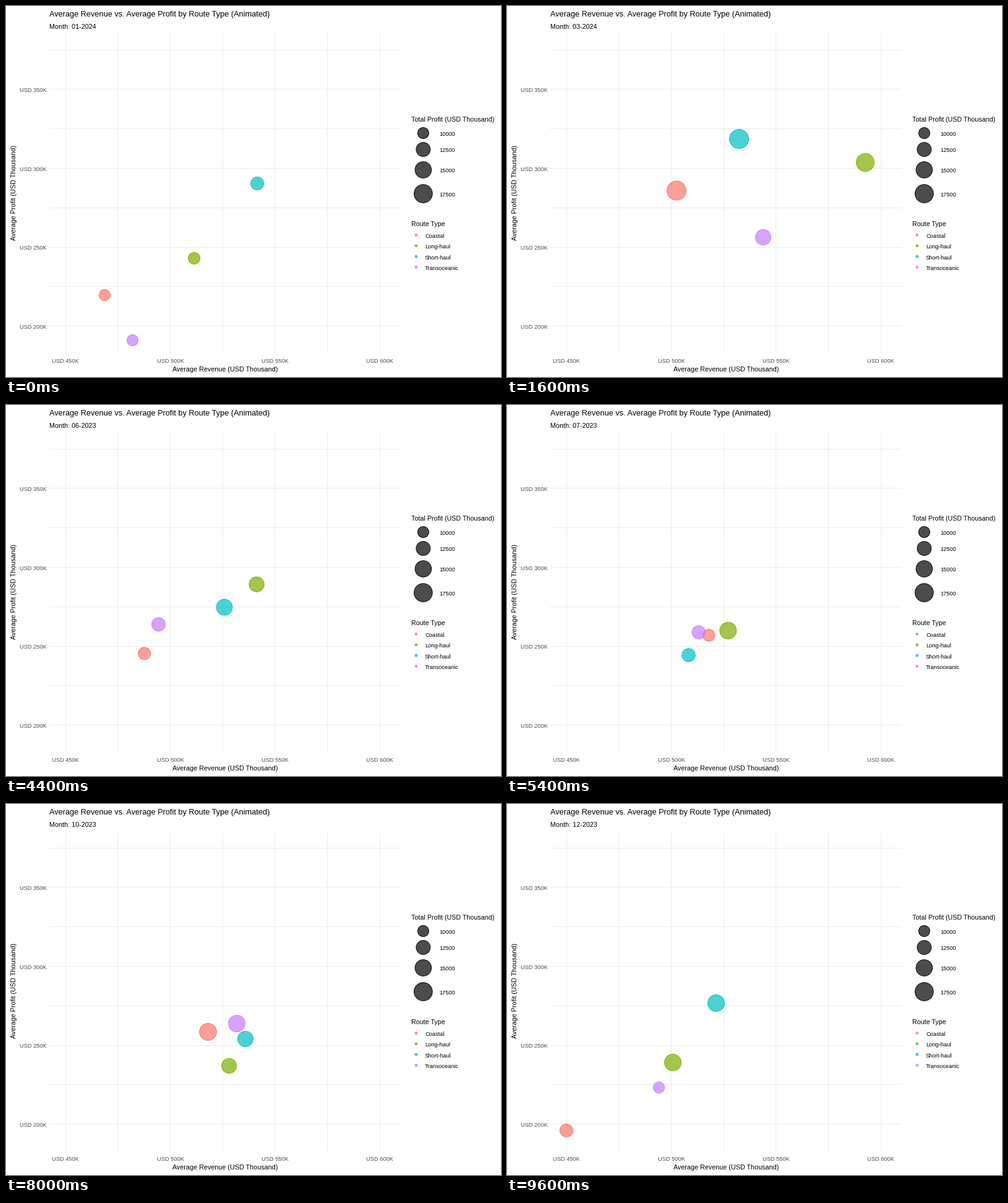
Write a matplotlib script that moves like this. It is 800 px wide and 600 px high and loops after 10 s.

```python
import math

import numpy as np
import matplotlib.pyplot as plt
from matplotlib.animation import FuncAnimation
from matplotlib.colors import to_rgba
from matplotlib.patches import Circle

plt.rcParams["font.family"] = "Liberation Sans"

W, H, DPI = 800, 600, 100
PX = 72 / DPI          # points per pixel
FRAMES, STEP = 100, 100
BEAT = 8               # frames from one month to the next
LEFT, RIGHT, TOP, BOTTOM = 70, 638, 44, 562

# Every month of one year, June twice, in text order
MONTHS = sorted(f"{(5 + i) % 12 + 1:02d}-{2023 + (5 + i) // 12}"
                for i in range(13))

COLORS = {"Coastal": "#F8766D", "Long-haul": "#7CAE00",
          "Short-haul": "#00BFC4", "Transoceanic": "#C77CFF"}

# Key points (month index, x, y, radius); months between are interpolated
KEYS = {
    "Coastal": [(0, 159.5, 467.5, 9.5), (2, 274, 298.5, 16),
                (3, 376, 226, 14.4), (5, 209, 406, 10.5),
                (8, 429, 343, 10), (10, 326.5, 368.5, 14.3),
                (12, 96, 528, 11)],
    "Long-haul": [(0, 304, 408, 10), (2, 579, 253, 15),
                  (3, 424.5, 286.6, 13.6), (5, 444.3, 241.3, 12.5),
                  (6, 248, 485, 13), (8, 612.5, 84.5, 16.5),
                  (10, 360.5, 423.5, 12.5), (12, 268, 418, 14)],
    "Short-haul": [(0, 406, 287, 11), (2, 375, 215, 16),
                   (3, 228, 487, 3.8), (4, 508, 292, 9.8),
                   (5, 361.5, 316, 13.8), (8, 234, 482, 9),
                   (10, 387, 380, 13), (12, 338, 322, 14)],
    "Transoceanic": [(0, 204.5, 540.5, 9.5), (2, 414, 374, 13),
                     (3, 336, 382, 11), (5, 237.5, 353, 11.5),
                     (8, 373, 380.5, 11), (10, 373, 355, 14),
                     (12, 245.5, 458.5, 9.5)],
}

fig = plt.figure(figsize=(W / DPI, H / DPI), dpi=DPI, facecolor="white")
ax = fig.add_axes([0, 0, 1, 1])
ax.set_xlim(0, W)
ax.set_ylim(H, 0)
ax.axis("off")


def label(x, y, text, size, color="black", ha="left"):
    return ax.text(x, y, text, fontsize=size * PX, color=color, ha=ha,
                   va="baseline")


def bubble(x, y, r, color):
    return ax.add_patch(Circle((x, y), r - 0.5, linewidth=PX, zorder=3,
                               facecolor=to_rgba(color, 0.7),
                               edgecolor=to_rgba(color, 0.9)))


def draw_grid():
    style = dict(color="#EBEBEB", linewidth=PX, zorder=1, snap=False,
                 solid_capstyle="butt")
    for i in range(7):
        x = math.floor(96.3 + 84.62 * i) + 0.5
        ax.plot([x, x], [TOP, BOTTOM], **style)
    for i in range(8):
        y = math.floor(71.05 + 63.8 * i) + 0.5
        ax.plot([LEFT, RIGHT], [y, y], **style)


def draw_axes():
    grey = "#4D4D4D"
    for i in range(4):
        label(96.3 + 169.2 * i, 577, f"USD {450 + 50 * i}K", 9.3, grey,
              "center")
        label(65.5, 139 + 127.7 * i, f"USD {350 - 50 * i}K", 9.3, grey,
              "right")
    label(354.5, 591, "Average Revenue (USD Thousand)", 10.75, ha="center")
    ax.text(18.3, 302, "Average Profit (USD Thousand)", rotation=90,
            fontsize=10.9 * PX, ha="right", va="center")


def draw_legends():
    label(LEFT + 585, 187, "Total Profit (USD Thousand)", 10.65)
    for i, y in enumerate((205.5, 232, 265, 303.5)):
        value = 10000 + 2500 * i
        bubble(674.3, y, 3.6 + math.sqrt((value - 7450) / 73), "black")
        label(700, y + 4.4, str(value), 9.1)
    label(LEFT + 585, 356, "Route Type", 10.65)
    for i, (name, color) in enumerate(COLORS.items()):
        y = 370.5 + 17.3 * i
        bubble(662.8, y, 2.3, color)
        label(677, y + 4.4, name, 9.16)


def month_states(keys):
    """x, y and radius of one route for every month."""
    when, *values = zip(*keys)
    return np.transpose([np.interp(range(len(MONTHS)), when, v)
                         for v in values])


draw_grid()
draw_axes()
draw_legends()
label(LEFT, 17, "Average Revenue vs. Average Profit by Route Type (Animated)",
      12.75)
month = label(LEFT, 37, "", 10.75)
bubbles = [bubble(0, 0, 1, color) for color in COLORS.values()]
states = [month_states(KEYS[name]) for name in COLORS]


def update(frame):
    now, pos = divmod(frame, BEAT)
    nxt = min(now + 1, len(MONTHS) - 1)
    hold = 2 if now == 0 else 3
    t = max(0, (pos - hold) / (BEAT - hold))
    for dot, state in zip(bubbles, states):
        x, y, r = state[now] + (state[nxt] - state[now]) * t
        dot.center = (x, y)
        dot.set_radius(r - 0.5)
    month.set_text("Month: " + MONTHS[nxt if t > 0.5 else now])
    return [*bubbles, month]


anim = FuncAnimation(fig, update, frames=FRAMES, interval=STEP,
                     init_func=lambda: update(0), repeat=True,
                     repeat_delay=0, blit=False)
plt.show()
```
